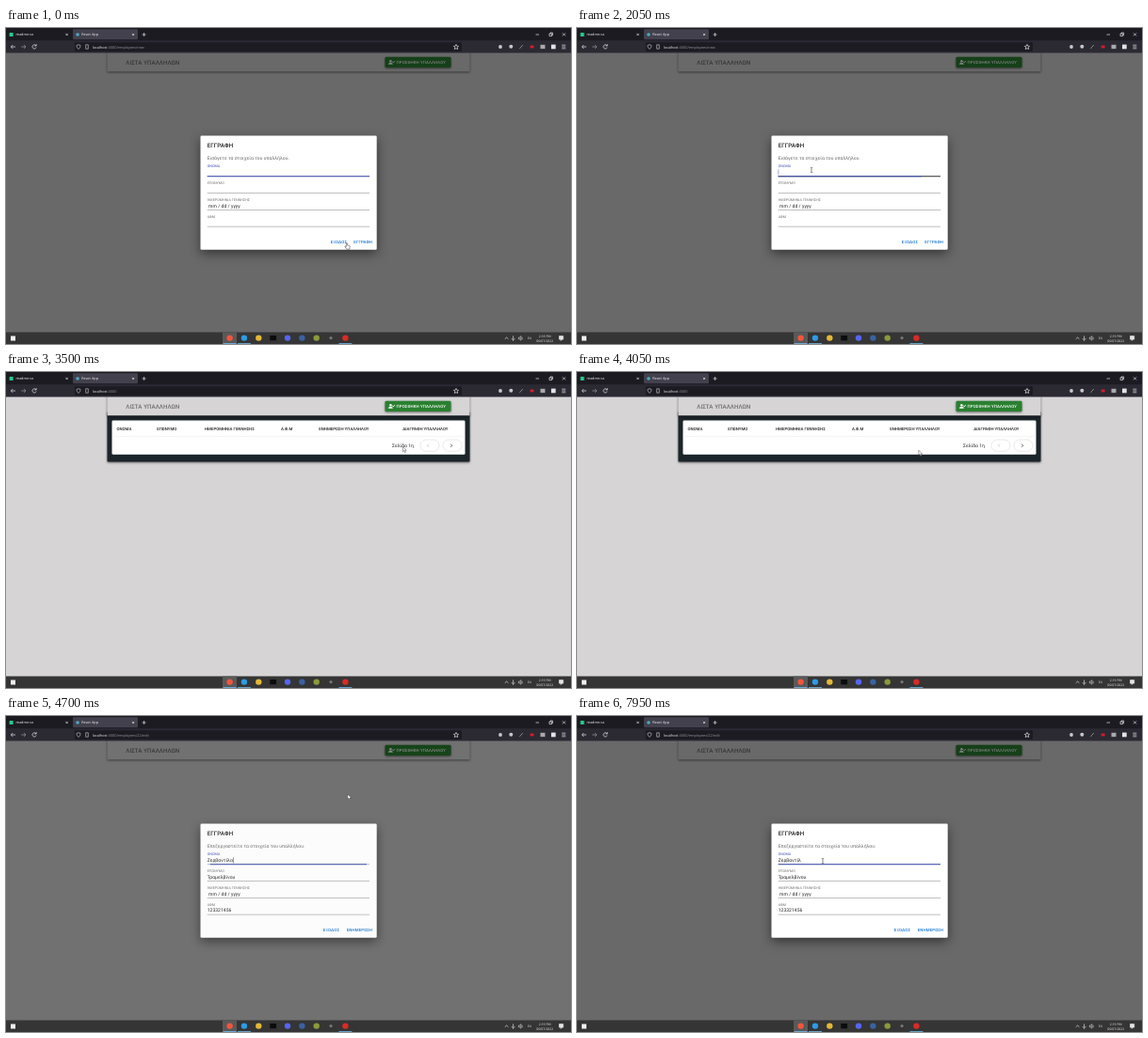
Write an HTML page that moves like this. It is 600 px wide and 336 px high and loops after 8000 ms.

```html
<!DOCTYPE html>
<html lang="el">
<head>
<meta charset="utf-8">
<title>React App</title>
<style>
  html, body { margin: 0; width: 100%; height: 100%; overflow: hidden; background: #1c1b22; }
  svg { display: block; width: 600px; height: 336px; }
  text { font: 5px Roboto, sans-serif; text-rendering: geometricPrecision; white-space: pre; }
  .ui { font: 3.8px "Open Sans", sans-serif; fill: #f0f0f2; }
  .dim { fill: #97969f; }
  .tray { font-size: 3.4px; text-anchor: middle; }
  .heading { font-size: 6.25px; font-weight: 500; letter-spacing: .0075em; }
  .label { font-size: 3.75px; fill: #757575; }
  .head { font-size: 4.375px; font-weight: 500; fill: #222; }
  .button { font-size: 4.375px; font-weight: 500; letter-spacing: .02857em; fill: #1976d2; }
  .body { fill: #666; letter-spacing: .00938em; }
  .value { fill: #222; letter-spacing: .00938em; }
  .line { fill: none; stroke: #e4e4e8; stroke-width: .7; }
  .lift { filter: drop-shadow(0 1px 1.3px rgba(0,0,0,.5)); }
  .lift-high { filter: drop-shadow(0 4px 6px rgba(0,0,0,.5)); }
</style>
</head>
<body>
<svg viewBox="0 0 600 336">
  <rect id="page" y="26" width="600" height="298" fill="#d6d4d5"/>

  <g id="list">
    <rect x="107.5" y="42" width="385" height="53.5" rx="1.2" fill="#1b252a" class="lift"/>
    <rect x="112.5" y="51.5" width="375" height="36.2" rx="1.3" fill="#fff"/>
    <path d="M112.5 68.5H487.5" stroke="#e6e6e6" stroke-width=".4"/>
    <g id="columns"></g>
    <text x="410" y="79.8" class="value">Σελίδα 1η</text>
    <g fill="#fff" stroke="#cfcfcf" stroke-width=".45">
      <rect x="440" y="72" width="20" height="12.3" rx="6"/>
      <rect x="464" y="72" width="20" height="12.3" rx="6"/>
    </g>
    <path d="M448.9 76.6l-1.5 1.6 1.5 1.6" class="line" style="stroke:#bbb"/>
    <path d="M472.2 76.6l1.5 1.6-1.5 1.6" class="line" style="stroke:#222"/>
  </g>

  <rect x="107.5" y="25" width="385" height="21.3" fill="#d6d4d5" class="lift"/>
  <text x="127.3" y="38.8" class="heading" fill="#6c6b6c">ΛΙΣΤΑ ΥΠΑΛΛΗΛΩΝ</text>
  <rect x="402.5" y="30.8" width="70" height="11.3" rx="1.25" fill="#2a8030" class="lift"/>
  <g fill="#fff">
    <circle cx="408.4" cy="35.2" r="1.25"/>
    <path d="M406 38.8c0-2.6 4.8-2.6 4.8 0zM410 36l.6-.5.8.8 1.3-1.5.5.5-1.8 2z"/>
    <text x="414.6" y="38" class="button" style="fill:#fff">ΠΡΟΣΘΗΚΗ ΥΠΑΛΛΗΛΟΥ</text>
  </g>

  <g id="overlay">
    <rect y="26" width="600" height="298" opacity=".5"/>
    <rect x="206.5" y="114.5" width="187.2" height="121.2" rx="1.3" fill="#fff" class="lift-high"/>
    <text x="213.7" y="126.9" class="heading" fill="#222">ΕΓΓΡΑΦΗ</text>
    <text id="prompt" x="213.7" y="140.1" class="body"></text>
    <g id="fields"></g>
    <rect id="hoverLine" x="213.7" y="157.3" width="172.3" height=".9" fill="#333"/>
    <rect id="focusLine" y="157.2" height="1" fill="#3f51b5"/>
    <rect id="caret" y="150.3" width=".5" height="6.2" fill="#333"/>
    <text id="exit" y="228.8" class="button" text-anchor="end">ΕΞΟΔΟΣ</text>
    <text id="submit" x="389.1" y="228.8" class="button" text-anchor="end"></text>
  </g>

  <g id="browser">
    <rect width="600" height="13.3" fill="#1c1b22"/>
    <rect y="13.2" width="600" height="13.3" fill="#2b2a33"/>
    <rect x="71" y="1.3" width="69" height="11" rx="1.2" fill="#42414d"/>
    <rect x="73" y="15.3" width="411" height="9.6" rx="1.2" fill="#1c1b22"/>
    <rect x="3.6" y="5" width="4" height="4" fill="#24c98b"/>
    <circle cx="76" cy="7" r="1.8" fill="#4aa9c4"/>
    <text x="10.4" y="8.3" class="ui">readme.so</text>
    <text x="80.2" y="8.3" class="ui">React App</text>
    <text x="91.8" y="21.5" class="ui">localhost<tspan id="path" class="dim"></tspan></text>
    <g class="line">
      <path d="M63.5 5.8l2.2 2.2m0-2.2l-2.2 2.2M134 5.8l2.2 2.2m0-2.2l-2.2 2.2M144.6 7h4m-2-2v4"/>
      <path d="M562.5 7h3.5M577 6h2.6v2.6H577zM578 6V5h2.6v2.6h-1M591 5.4l3 3m0-3l-3 3"/>
      <path d="M10 20H5.3m2-2l-2 2 2 2"/>
      <path d="M16.2 20h4.7m-2-2l2 2-2 2" style="stroke:#9a99a2"/>
      <path d="M32 19a2.1 2.1 0 1 0 .1 1.6M32.2 17.2V19h-1.8"/>
      <path d="M77 17.7l2 .7c0 2-.6 3.2-2 4-1.4-.8-2-2-2-4zM84.7 17.8h2.6v4.4h-2.6z" style="stroke:#b9b8c2"/>
      <path d="M478 17.5l.8 1.7 1.8.2-1.3 1.2.4 1.9-1.7-.9-1.7.9.4-1.9-1.3-1.2 1.8-.2z"/>
      <path d="M545.3 22l3.5-4" style="stroke:#a7a6ac"/>
      <path d="M590.3 18.2h4m-4 1.8h4m-4 1.8h4"/>
    </g>
    <circle cx="525" cy="20" r="1.9" fill="#c9c8ce"/>
    <circle cx="536.3" cy="19.7" r="2" fill="#c5c6cf"/>
    <rect x="556.6" y="18.6" width="4" height="2.8" fill="#cf1d2b"/>
    <rect x="567.5" y="17.8" width="5" height="4.3" fill="#a9a8ae"/>
    <rect x="579" y="17.6" width="4.7" height="4.7" fill="#e3e3e6"/>
  </g>

  <g id="taskbar">
    <rect y="323.5" width="600" height="12.5" fill="#353535"/>
    <rect x="230" y="323.5" width="15" height="12.5" fill="#595959"/>
    <rect x="5" y="327.5" width="5" height="5" fill="#f2f2f2"/>
    <g id="apps"></g>
    <g class="line">
      <path d="M529.8 330.7l1.8-1.7 1.8 1.7M538.6 327.4v3.4m-1.4-.8c0 2 2.8 2 2.8 0m-1.4 1.6v1.2"/>
      <path d="M544.4 329h1l1.4-1.3v4.4l-1.4-1.3h-1zM547.8 328.6q1 1.3 0 2.7" style="stroke:#ccc"/>
      <path d="M587.5 327.6h4.2v3.5h-1.5l-1 1.3v-1.3h-1.7z" fill="#e4e4e8"/>
    </g>
    <text x="556" y="331.3" class="ui tray">ΕΛ</text>
    <text id="clock" x="572.2" y="328.6" class="ui tray"></text>
    <text x="572.2" y="334" class="ui tray">06/07/2022</text>
  </g>

  <g id="pointer">
    <path id="arrow" d="M0 0v5.2l1.2-1.1.9 2 .9-.4-.9-1.9h1.7z" fill="#fff" stroke="#222" stroke-width=".4"/>
    <path id="beam" d="M-1.2-2.6h.8L0-2.2l.4-.4h.8M0-2.2v4.4M-1.2 2.6h.8L0 2.2l.4.4h.8" fill="none" stroke="#222" stroke-width=".55"/>
    <path id="hand" d="M-.5 0q.5-.6 1 0v2.3l2.4.5q.6.2.5.9l-.5 2.9H0L-1.9 4q.1-.8.9-.3l.5.4z" fill="#fff" stroke="#111" stroke-width=".45"/>
  </g>
</svg>

<script>
const LOOP = 8000, CLOSE = 3200, EDIT = 4560, FADE = 4575;
const LEFT = 213.7, WIDTH = 172.3;
const NAME = 'Ζερβαντίλα', SURNAME = 'Τραμελβίνου';
const $ = id => document.getElementById(id);
const clamp = x => Math.max(0, Math.min(1, x));
const ease = x => x * x * (3 - 2 * x);
const show = (id, on) => $(id).style.display = on ? '' : 'none';
const set = (id, attrs) => Object.entries(attrs).forEach(([k, v]) => $(id).setAttribute(k, v));
const write = (id, text) => { if ($(id).textContent !== text) $(id).textContent = text; };

$('columns').innerHTML = [
  [117.5, 'ΟΝΟΜΑ'], [160.3, 'ΕΠΩΝΥΜΟ'], [211, 'ΗΜΕΡΟΜΗΝΙΑ ΓΕΝΝΗΣΗΣ'],
  [292, 'Α.Φ.Μ'], [332.3, 'ΕΝΗΜΕΡΩΣΗ ΥΠΑΛΛΗΛΟΥ'], [421.2, 'ΔΙΑΓΡΑΦΗ ΥΠΑΛΛΗΛΟΥ']
].map(([x, text]) => `<text x="${x}" y="61.6" class="head">${text}</text>`).join('');

$('fields').innerHTML = ['ΟΝΟΜΑ', 'ΕΠΩΝΥΜΟ', 'ΗΜΕΡΟΜΗΝΙΑ ΓΕΝΝΗΣΗΣ', 'ΑΦΜ'].map((label, i) => {
  const y = 148.4 + 17.75 * i;
  return `<text x="${LEFT}" y="${y}" class="label"${i ? '' : ' style="fill:#3f51b5"'}>${label}</text>
    <text id="value${i}" x="${i === 2 ? 215 : LEFT}" y="${y + 6.7}" class="value"></text>
    <rect x="${LEFT}" y="${y + 9.2}" width="${WIDTH}" height=".5" opacity=".5"/>`;
}).join('');
write('value2', 'mm / dd / yyyy');

const appColors = ['#f0563c', '#2b9be8', '#e5b637', '#0c0c0c', '#5865f2', '#39639f', '#8a9a3b', '#777', '#d92b26'];
$('apps').innerHTML = appColors.map((color, i) => {
  const x = 237.6 + 15.35 * i;
  const mark = i === 3
    ? `<rect x="${x - 3.4}" y="327" width="6.8" height="5.2" fill="${color}"/>`
    : `<circle cx="${x}" cy="329.6" r="${i === 7 ? 1.6 : 3.2}" fill="${color}"/>`;
  const open = [0, 1, 8].includes(i) ? `<rect x="${x - 7}" y="335.2" width="14" height=".8" fill="#76b9ed"/>` : '';
  return mark + open;
}).join('');

// Pointer stops: time, x, y
const stops = [
  [0, 361.8, 228.6], [1300, 361.8, 228.6], [1850, 249, 151], [2450, 249, 151],
  [2950, 353, 226.5], [CLOSE, 353, 226.5], [3480, 421.4, 79.5], [3600, 421.4, 79.5],
  [4050, 362.8, 83.2], [5100, 362.8, 83.2], [5800, 261, 154.2], [LOOP, 261, 154.2]
];

function pointerAt(t) {
  const i = stops.findIndex(s => s[0] > t);
  const [t0, x0, y0] = stops[i - 1], [t1, x1, y1] = stops[i];
  const u = ease((t - t0) / (t1 - t0));
  return [x0 + (x1 - x0) * u, y0 + (y1 - y0) * u];
}

function render(t) {
  const editing = t >= EDIT, listing = t >= CLOSE && !editing, open = !listing;
  const [x, y] = pointerAt(t);
  const overInput = open && x > LEFT && x < 386 && y > 149.5 && y < 158.5;
  const overButton = open && x > 340 && x < 391 && y > 222 && y < 232;

  show('list', listing);
  show('overlay', open);
  $('overlay').style.opacity = editing ? ease(clamp((t - FADE) / 150)) : 1;
  write('path', ':3000' + (listing ? '' : editing ? '/employees/22/edit' : '/employees/new'));
  write('clock', t < 1300 ? '2:18 PM' : '2:19 PM');

  const loaded = t >= 4640, erased = t >= 7400;
  write('prompt', editing ? 'Επεξεργαστείτε τα στοιχεία του υπαλλήλου.' : 'Εισάγετε τα στοιχεία του υπαλλήλου.');
  write('submit', editing ? 'ΕΝΗΜΕΡΩΣΗ' : 'ΕΓΓΡΑΦΗ');
  set('exit', { x: editing ? 354 : 362 });
  write('value0', loaded ? (erased ? NAME.slice(0, -1) : NAME) : '');
  write('value1', loaded ? SURNAME : '');
  write('value3', loaded ? '123321456' : '');

  const hover = overInput && !editing;
  const grow = editing ? 1 - (1 - clamp((t - 4600) / 150)) ** 3 : 1;
  const width = hover ? WIDTH - 20 : WIDTH * grow;
  show('hoverLine', hover);
  set('focusLine', { x: editing ? LEFT + (WIDTH - width) / 2 : LEFT, width });

  const focusTime = erased ? 7400 : editing ? 4640 : t >= 1950 ? 1950 : -500;
  show('caret', t >= focusTime && (t - focusTime) % 1000 < 500);
  set('caret', { x: LEFT + (loaded ? $('value0').getComputedTextLength() + .5 : 0), fill: loaded ? '#333' : '#3f51b5' });

  set('pointer', { transform: `translate(${x} ${y})` });
  show('beam', overInput);
  show('hand', overButton);
  show('arrow', !overInput && !overButton);
}

function tick() {
  render(performance.now() % LOOP);
  requestAnimationFrame(tick);
}
tick();
</script>
</body>
</html>
```
